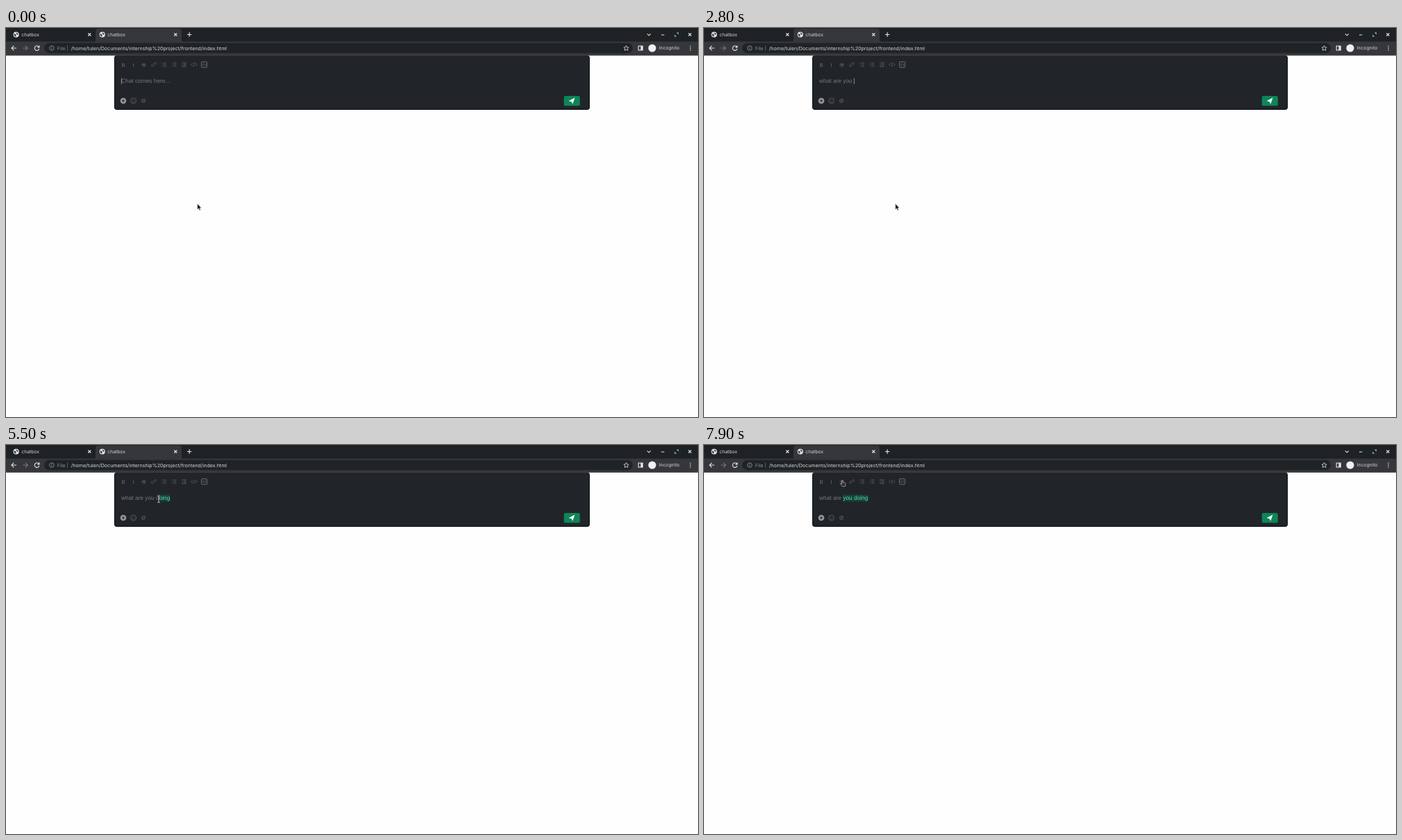
Write an HTML page that moves like this. It is 997 px wide and 561 px high and loops after 8000 ms.

```html
<!DOCTYPE html>
<html lang="en">
<head>
<meta charset="utf-8">
<title>chatbox</title>
<style>
  html, body { margin: 0; height: 100%; overflow: hidden; background: #fefefe; }
  svg { display: block; width: 100vw; height: 100vh; }
  text { white-space: pre; text-rendering: geometricPrecision; }
  .ui { font: 6.75px Inter, sans-serif; fill: #d4d6d8; }
  .url { font-size: 7.1px; }
  .chat { font: 8.34px "Liberation Sans", Arial, sans-serif; fill: #76797c; }
  .line { fill: none; stroke: #e3e4e6; stroke-width: 1.1; }
  .tool { fill: none; stroke: #595d61; stroke-width: .9; }
  .glyph { font: 7.5px "Liberation Sans", sans-serif; fill: #6b6f73; text-anchor: middle; }
  .pointer { stroke-linejoin: round; }
</style>
</head>
<body>
<svg viewBox="0 0 997 561">
  <defs>
    <g id="globe">
      <circle r="4.1" fill="#e2e3e5"/>
      <path d="M-3-1.6L-.6-.4 0 1.4-1 3.2-3 1zM0-3.2L2.8-1.6 2.4.4.6-.6z" fill="#3c4043"/>
    </g>
    <path id="cross" d="M-2-2L2 2M2-2L-2 2" class="line"/>
    <path id="bullets" d="M-3.2-2.4h1M-3.2 0h1M-3.2 2.4h1M-1-2.4h4.4M-1 0h4.4M-1 2.4h4.4" class="tool"/>
  </defs>

  <!-- browser tabs -->
  <path d="M0 0h997v20H0z" fill="#1f2225"/>
  <path d="M126 20q3 0 3-3V5q0-4 4-4h116q4 0 4 4v12q0 3 3 3z" fill="#35373a"/>
  <use href="#globe" x="14.6" y="9.5"/>
  <use href="#globe" x="138.7" y="9.5"/>
  <text class="ui" x="22.3" y="11.7">chatbox</text>
  <text class="ui" x="146.3" y="11.7">chatbox</text>
  <use href="#cross" x="120.3" y="9.5"/>
  <use href="#cross" x="244.3" y="9.5"/>
  <path class="line" d="M261 9.5h6.4M264.2 6.3v6.4"/>
  <path class="line" d="M923.8 8.3l2.5 2.5 2.5-2.5M944 10h4.4"/>
  <path d="M966 6.5h3v3zM963.2 9.6v3h3z" fill="#7fd0bd"/>
  <use href="#cross" x="985.3" y="9.5"/>

  <!-- address bar -->
  <path d="M0 19.5h997v20.2H0z" fill="#35373a"/>
  <rect x="55" y="21.8" width="848" height="14.4" rx="7.2" fill="#202326"/>
  <path class="line" d="M15 29H8.2M11.3 25.7L8 29l3.3 3.3"/>
  <path class="line" d="M24.3 29h6.8M28 25.7l3.3 3.3-3.3 3.3" style="stroke:#75787b"/>
  <path class="line" d="M47.3 27.3A3.3 3.3 0 1 0 47.7 30M47.9 25.3v2.6h-2.6"/>
  <circle class="line" cx="65.9" cy="29" r="3.3" style="stroke:#9a9da0;stroke-width:.8"/>
  <path class="line" d="M65.9 28.4v2.4M65.9 26.8v.9" style="stroke:#9a9da0;stroke-width:.8"/>
  <text class="ui url" x="73.7" y="31.5" style="fill:#8e9194">File</text>
  <path d="M88.5 25.3v7.4" stroke="#6c6f72" stroke-width=".8"/>
  <text class="ui url" x="93.7" y="31.5">/home/tulen/Documents/internship%20project/frontend/index.html</text>
  <path class="line" d="M893.6 25.4l1.1 2.4 2.5.3-1.9 1.7.6 2.6-2.3-1.3-2.3 1.3.6-2.6-1.9-1.7 2.5-.3z" style="stroke-width:.8"/>
  <rect class="line" x="911.2" y="26" width="6" height="6"/>
  <path d="M914.4 26h3v6h-3z" fill="#e3e4e6"/>
  <circle cx="931" cy="29" r="5.6" fill="#f0f1f2"/>
  <text class="ui" x="940.7" y="31.4">Incognito</text>
  <path d="M985.3 25.4h1.4v1.4h-1.4zm0 2.9h1.4v1.4h-1.4zm0 2.9h1.4v1.4h-1.4z" fill="#d4d6d8"/>

  <!-- message box -->
  <rect x="156.5" y="40.2" width="684" height="77.2" rx="3.5" fill="#212529" stroke="#111518" stroke-width="1.2"/>
  <text class="glyph" x="169" y="55.5" font-weight="bold">B</text>
  <text class="glyph" x="183.6" y="55.5" font-style="italic">I</text>
  <text class="glyph" x="198.4" y="55.5">S</text>
  <path class="tool" d="M194.8 52.9h7.2"/>
  <path class="tool" d="M212.3 52.2l1.8-1.8q1-.8 1.8 0t0 1.8l-1.8 1.8M213.6 53.3l-1.8 1.8q-1 .8-1.8 0t0-1.8l1.8-1.8"/>
  <use href="#bullets" x="227.5" y="52.8"/>
  <use href="#bullets" x="242" y="52.8"/>
  <path class="tool" d="M253.2 50.1h6.4M256 52h3.6M256 53.8h3.6M253.2 55.6h6.4M253.4 51.8l1.5 1.1-1.5 1.1"/>
  <path class="tool" d="M269 50.6l-2.2 2.2 2.2 2.2M273 50.6l2.2 2.2-2.2 2.2M271.8 49.8l-1.6 6"/>
  <rect class="tool" x="281.6" y="48.8" width="8" height="8" rx="1" style="stroke:#74787b"/>
  <path class="tool" d="M284.8 51.2l-1.5 1.6 1.5 1.6M286.4 51.2l1.5 1.6-1.5 1.6" style="stroke:#74787b"/>
  <circle cx="169" cy="105" r="4.3" fill="#96999b"/>
  <path d="M166.8 105h4.4M169 102.8v4.4" stroke="#212529"/>
  <circle class="tool" cx="183.6" cy="105" r="4"/>
  <path class="tool" d="M181.7 106q1.9 2.2 3.8 0M182.2 103.2v1M185 103.2v1"/>
  <text class="glyph" x="198" y="107.4" style="font-size:7px">@</text>
  <rect x="803.8" y="98" width="23" height="14.2" rx="2" fill="#0d8558"/>
  <path d="M810.6 105.3l9-4.8-3.3 9.2-1.6-3.5z" fill="#fff"/>

  <rect id="selection" y="71.8" height="9.6" fill="#174438"/>
  <text id="message" class="chat" x="166" y="79.4"><tspan id="plain">what are you doing</tspan><tspan id="marked" fill="#55d6a8"></tspan></text>
  <path id="caret" d="M.4 72.3v8.8" stroke="#a3a6a8" stroke-width=".8"/>

  <path id="arrow" class="pointer" d="M0 0v8.2l1.8-1.7 1.3 3 1.4-.6-1.3-2.9h2.5z" fill="#111" stroke="#ddd" stroke-width=".5"/>
  <path id="beam" class="pointer" d="M-1.8-5Q0-5 0-4 0-5 1.8-5M0-4v8M-1.8 5Q0 5 0 4 0 5 1.8 5" fill="none" stroke="#c3c6c8" stroke-width="1"/>
  <path id="hand" class="pointer" d="M-1.3-4.2q.8-1 1.5 0v3l3 .7q.9.4.7 1.4l-.6 3.6h-4l-2.6-3.6q0-1.2 1.2-.6l.8.8z" fill="#25282b" stroke="#bfc2c4" stroke-width=".7"/>
</svg>
<script>
const LOOP = 8000;
const PLACEHOLDER = 'Chat comes here...';
const PHRASE = 'what are you doing';
const CARET_OFF = 4400, DRAG_START = 5300;

// [time, typed characters]
const typing = [
  [0, 0], [500, 1], [700, 2], [900, 4], [1100, 5], [1600, 6],
  [1800, 7], [1900, 8], [2000, 9], [2500, 10], [2600, 11], [2700, 12], [2800, 13],
  [3300, 14], [3400, 15], [3500, 16], [3700, 17], [3800, 18]
];

// [time, pointer, x, y]
const moves = [
  [0, 'arrow', 275.8, 253.6], [4600, 'arrow', 268, 215], [4700, 'arrow', 250, 130],
  [4800, 'beam', 242, 80], [5000, 'beam', 238.5, 79],
  [5300, 'beam', 235, 79], [5400, 'beam', 228, 78.5], [5500, 'beam', 220, 78],
  [5600, 'beam', 214, 77], [5700, 'beam', 209, 76.5], [5800, 'beam', 206, 76],
  [6400, 'beam', 205.2, 75.5], [6500, 'beam', 204.4, 75.3], [6600, 'beam', 202.2, 75.2], [6700, 'beam', 201.2, 75.2],
  [7300, 'beam', 200.5, 73], [7400, 'arrow', 199, 67], [7500, 'arrow', 197, 60],
  [7600, 'hand', 197, 56], [7700, 'hand', 199, 55], [7900, 'hand', 200, 55.2]
];

const el = id => document.getElementById(id);
const [message, plain, marked, selection, caret] =
  ['message', 'plain', 'marked', 'selection', 'caret'].map(el);
const pointers = ['arrow', 'beam', 'hand'];
const latest = (list, t) => list.findLast(item => item[0] <= t);

const edges = [...PHRASE].map((_, i) => message.getStartPositionOfChar(i).x);
edges.push(message.getEndPositionOfChar(PHRASE.length - 1).x);

const nearestEdge = x =>
  edges.reduce((best, edge, i) => Math.abs(edge - x) < Math.abs(edges[best] - x) ? i : best, 0);

function selectionStart(t) {
  if (t < DRAG_START) return PHRASE.length;
  return nearestEdge(latest(moves.filter(m => m[1] === 'beam'), t)[2]);
}

function draw(t) {
  const count = latest(typing, t)[1];
  const start = selectionStart(t);
  plain.textContent = count ? PHRASE.slice(0, Math.min(count, start)) : PLACEHOLDER;
  marked.textContent = PHRASE.slice(start, count);
  selection.setAttribute('x', edges[start]);
  selection.setAttribute('width', edges[PHRASE.length] - edges[start]);
  caret.setAttribute('transform', `translate(${edges[count]})`);
  caret.style.display = t < CARET_OFF ? '' : 'none';

  const [, shape, x, y] = latest(moves, t);
  for (const id of pointers) {
    el(id).style.display = id === shape ? '' : 'none';
    el(id).setAttribute('transform', `translate(${x} ${y})`);
  }
}

const began = performance.now();
function tick() {
  draw((performance.now() - began) % LOOP);
  requestAnimationFrame(tick);
}
tick();
</script>
</body>
</html>
```
